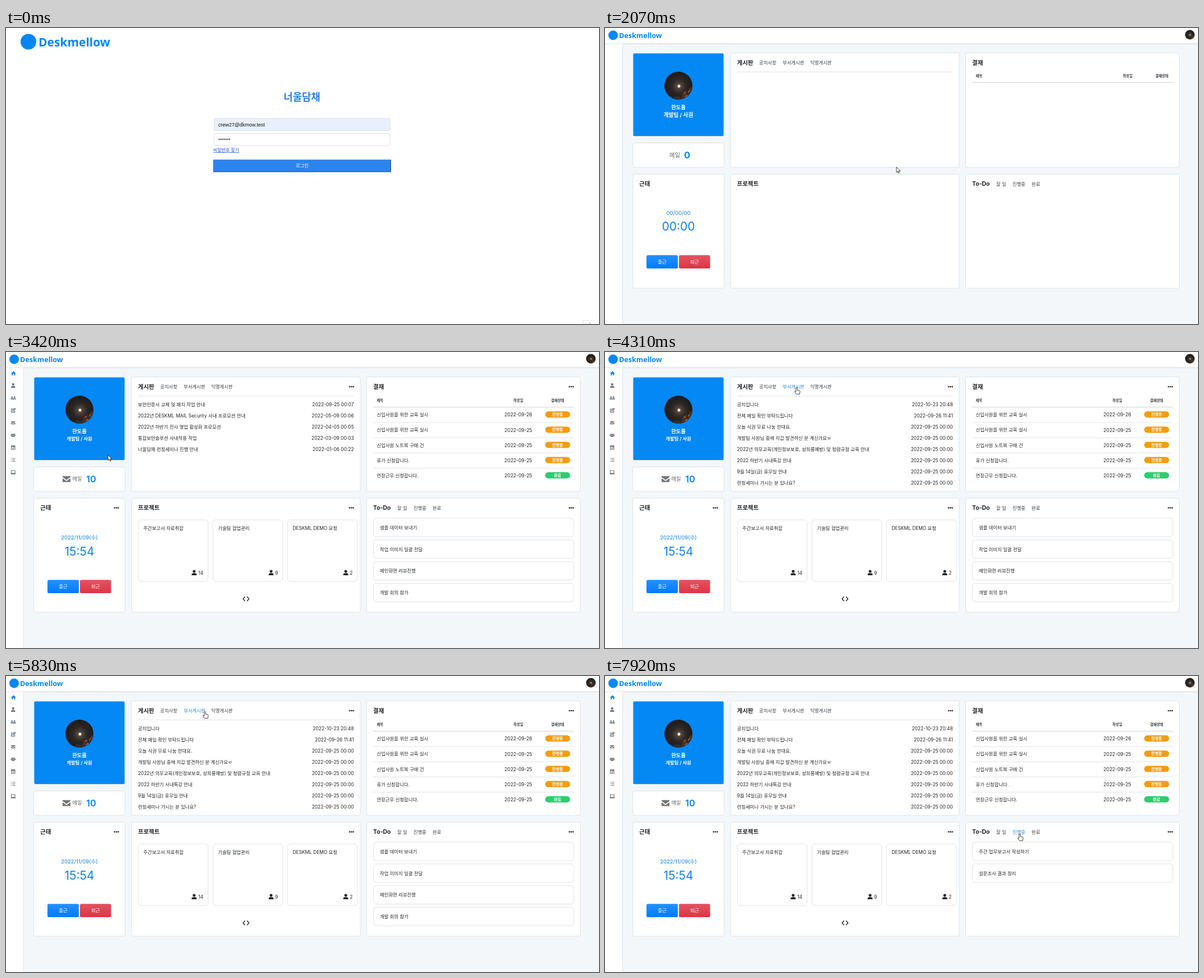
An HTML page for the animation above (7.99 s loop, 1058 by 529 pixels).

```html
<!DOCTYPE html>
<html lang="ko">
<head>
<meta charset="utf-8">
<title>Groupware tour</title>
<style>
  html, body { margin: 0; width: 100%; height: 100%; overflow: hidden; background: #fff; }
  svg { display: block; width: 1058px; height: 529px; font-family: Inter, 'Noto Sans CJK KR', sans-serif; }
  .brand { font-family: 'Noto Sans', 'Noto Sans CJK KR', sans-serif; }
  .arial { font-family: 'Liberation Sans', 'Noto Sans CJK KR', sans-serif; }
</style>
</head>
<body>
<svg id="stage" viewBox="0 0 1058 529" xmlns="http://www.w3.org/2000/svg"></svg>
<script>
const LOOP = 7990;
const BLUE = '#0388f4', INK = '#212529', LINE = '#dee2e6', GRAY = '#6c757d';

// drawing helpers
const text = (x, y, s, size = 8.4, o = {}) =>
  `<text x="${x}" y="${y}" font-size="${size}" font-weight="${o.w || 400}" fill="${o.c || INK}"` +
  ` text-anchor="${o.a || 'start'}" ${o.x || ''}>${s}</text>`;
const box = (x, y, x2, y2, fill, stroke = 'none', r = 0, extra = '') =>
  `<rect x="${x}" y="${y}" width="${x2 - x}" height="${y2 - y}" rx="${r}" fill="${fill}" stroke="${stroke}" ${extra}/>`;
const dot = (x, y, r, fill) => `<circle cx="${x}" cy="${y}" r="${r}" fill="${fill}"/>`;
const path = (d, fill = 'none', stroke = 'none', w = 1) =>
  `<path d="${d}" fill="${fill}" stroke="${stroke}" stroke-width="${w}"/>`;
const hline = (x, x2, y, c = LINE) => path(`M${x} ${y}H${x2}`, 'none', c);
const at = (x, y, s, k = 1) => `<g transform="translate(${x} ${y}) scale(${k})">${s}</g>`;
const more = (x, y = 278.5) => [0, 3.3, 6.6].map(d => dot(x + d, y, 1.35, INK)).join('');
const title = (x, y, s) => text(x, y, s, 10.5, { w: 700 });
const card = (x, y, x2, y2) => box(x, y, x2, y2, '#fff', '#dbe3ea', 2.5);

// groups shown between two times
const layers = [];
const layer = (from, to, s) => {
  layers.push({ from, to });
  return `<g class="layer">${s}</g>`;
};

// hoverable tabs
const tabs = [];
const tab = (x, x2, y, s) => {
  tabs.push({ x, x2, y });
  return text(x, y, s, 8.35, { c: '#343a40', x: 'class="tab"' });
};

const person = '<circle cy="-2.3" r="2.3"/><path d="M-4 4.2V3Q-4 .6-1.6.6H1.6Q4 .6 4 3V4.2Z"/>';
const envelope = '<path d="M-4-3H4V-2L0 1L-4-2ZM-4-.8L0 2.2L4-.8V3.2H-4Z"/>';

const photo = (x, y, r) => at(x, y,
  `<circle r="25" fill="url(#night)"/><g clip-path="url(#disc)">
   <path d="M4 25L8 12L14 8L16 18L20 4L25 2V25Z" fill="#4a2f22"/>
   <path d="M-12 25L-6 19L3 20L8 25Z" fill="#33302b"/>
   <path d="M10 14L13 12M17 12L20 8M12 20L16 17" stroke="#c4713c" stroke-width="1.2"/></g>
   <circle cx="1" cy="1" r="2.4" fill="#fff3dc"/>`, r / 25);

function login() {
  return box(0, 0, 1058, 529, '#fff') +
    dot(40, 24.5, 14, '#0886f0') +
    `<g class="brand">${text(58, 33, 'Deskmellow', 21, { w: 600, c: '#0886f0' })}</g>` +
    text(528, 130.3, '너울담채', 17.8, { w: 700, c: '#2b80e6', a: 'middle' }) +
    box(371.3, 161.7, 685.2, 183.4, '#e8f0fe', '#d0d8e5', 2.5, 'stroke-width=".8"') +
    box(371.3, 188.4, 685.2, 210.1, '#fff', '#d6dae0', 2.5, 'stroke-width=".8"') +
    `<g class="arial">${text(378.7, 175.5, 'crew27@dkmow.test', 9, { c: '#111' })}</g>` +
    Array.from({ length: 7 }, (_, i) => dot(380.3 + i * 3.1, 198.8, 1.15, '#222')).join('') +
    text(370, 221.3, '비밀번호 찾기', 7.9, { c: '#1d4fd8', x: 'text-decoration="underline"' }) +
    box(369.5, 235.2, 687, 257.4, '#2d84ec') +
    path('M370 256.8H686.4V235.6', 'none', '#1c5199', 1.1) +
    text(528.5, 249.4, '로그인', 8.1, { c: '#fff', a: 'middle' });
}

const tooltip = box(1029.5, 522.5, 1049, 540, '#fff', '#e2e2e2') +
  text(1039, 532, '노트', 7, { c: '#aaa', a: 'middle' });

function frame() {
  return box(0, 0, 1058, 529, '#fff') + box(31.5, 28, 1060, 531, '#f3f7f9', LINE) +
    hline(0, 1058, 28) + dot(14.5, 13, 8.5, BLUE) +
    `<g class="brand">${text(25, 18, 'Deskmellow', 12.6, { w: 600, c: '#0886f0' })}</g>` +
    photo(1043.5, 12, 8.5) +
    box(50, 45, 212, 193.5, BLUE, '#cfe4f6', 2.5) + photo(131, 103, 25) +
    text(131, 144.6, '한도율', 9.5, { w: 700, c: '#fff', a: 'middle' }) +
    card(49.5, 205.5, 212.5, 249) + card(49.5, 261.5, 212.5, 465) +
    card(224, 44.5, 632, 249) + card(224.5, 261.5, 632, 465) +
    card(643.5, 44.5, 1024.5, 249) + card(643.5, 261.5, 1024.5, 465) +
    title(61, 282, '근태') + title(235.5, 66, '게시판') + title(235.5, 282, '프로젝트') +
    title(655, 66, '결재') + title(655, 282, 'To-Do') +
    tab(275, 306, 65.2, '공지사항') + tab(317, 355, 65.2, '부서게시판') + tab(366, 405, 65.2, '익명게시판') +
    tab(698, 716, 281.8, '할 일') + tab(727, 750, 281.8, '진행중') + tab(761, 777, 281.8, '완료') +
    hline(235.5, 620.5, 78.5);
}

// clock, buttons and table head, placed a little differently before loading ends
function clock(date, size, time, dy) {
  const button = (x, x2, id, s) => box(x, 407.3 + dy, x2, 431 + dy, `url(#${id})`, 'none', 2.5) +
    text((x + x2) / 2, 422.3 + dy, s, 8.5, { c: '#fff', a: 'middle' });
  return text(131, 335.4 + dy, date, size, { c: '#0f80e8', a: 'middle' }) +
    text(131, 363.6 + dy, time, 21, { c: '#0f80e8', a: 'middle' }) +
    button(74, 130, 'blue', '출근') + button(132, 187.5, 'red', '퇴근');
}
function tableHead(x, x2, dy) {
  const o = { w: 700, c: '#343a40' }, m = { ...o, a: 'middle' };
  return text(661.5, 88.6 + dy, '제목', 6.3, o) + text(x, 88.6 + dy, '작성일', 6.3, m) +
    text(x2, 88.6 + dy, '결재상태', 6.3, m) + hline(655, 1013, 98.5 + dy, '#cdd2d7');
}
const dept = size => text(131, size > 9 ? 158.8 : 158, '개발팀 / 사원', size, { w: 700, c: '#fff', a: 'middle' });

function sideIcons() {
  const icons = [
    '<path d="M-4.6.2L0-4L4.6.2L4 1L3.2.4V4H1V1H-1V4H-3.2V.4L-4 1Z" fill="#0886f0"/>',
    person,
    at(-2.2, 0, person, .68) + at(2.6, 0, person, .68),
    '<path d="M1.5-2.8H-3.5V3.6H3V.5M-1 1L-.6-.8L3.2-4L4.4-2.8L.8.6Z" fill="none" stroke="#6c757d" stroke-width="1.3"/>',
    envelope,
    at(-3, -.5, person, .5) + at(3, -.5, person, .5) + at(0, .4, person, .72),
    '<path d="M-3.5-3H3.5V4H-3.5ZM-2-4.4V-2M2-4.4V-2M-1.6 1L-.3 2.3L2-.2" fill="none" stroke="#6c757d" stroke-width="1.2"/><path d="M-3.5-3H3.5V-1H-3.5Z"/>',
    [-3, 0, 3].map(y => `<path d="M-4 ${y - .6}H-2.6V${y + .6}H-4ZM-1.5 ${y - .5}H4V${y + .5}H-1.5Z"/>`).join(''),
    '<path d="M-3.6-3H3.6V2.3H-3.6ZM-4.8 3.3H4.8" fill="none" stroke="#6c757d" stroke-width="1.2"/>'
  ];
  return `<g fill="${GRAY}">${icons.map((s, i) => at(i ? 12.8 : 13.3, 38 + i * 22.1, s, .92)).join('')}</g>`;
}

const board = rows => rows.map(([s, d], i) =>
  text(235.5, 97.2 + i * 20, s) +
  text(620.7, 97.2 + i * 20, '2022-' + (d || '09-25 00:00'), 8.45, { a: 'end' })).join('');
const notices = [
  ['보안인증서 교체 및 패치 작업 안내', '09-25 00:07'],
  ['2022년 DESKML MAIL Security 사내 프로모션 안내', '05-09 00:06'],
  ['2022년 하반기 전사 영업 활성화 프로모션', '04-05 00:05'],
  ['통합보안솔루션 사내적용 작업', '03-09 00:03'],
  ['너울담채 런칭세미나 진행 안내', '01-06 00:22']
];
const teamPosts = [
  ['공지입니다', '10-23 20:48'], ['전체 메일 확인 부탁드립니다', '09-26 11:41'],
  ['오늘 식권 무료 나눔 한대요.'], ['개발팀 사원님 중에 지갑 발견하신 분 계신가요ㅠ'],
  ['2022년 의무교육(개인정보보호, 성희롱예방) 및 청렴규정 교육 안내'],
  ['2022 하반기 사내특강 안내'], ['9월 14일(금) 휴무일 안내'], ['런칭세미나 가시는 분 있나요?']
];
const smoke = ['담배는 흡연구역에서 핍시다!'], gossip = ['밑글 보고 적는데 전담은 괜찮은가요'];
const anonPosts = [
  ['옥장판 하나 사세요 ~!', '09-26 10:02'], smoke, gossip, ['공포 웹툰 추천해주세요'],
  ['오늘 점심 뭔가요?'], ['저 오늘 야근 당첨입니다'], smoke, gossip
];

const rowTop = i => 99 + i * 27.2;
function approvals() {
  const rows = ['신입사원을 위한 교육 실시', '신입사원을 위한 교육 실시', '신입사원 노트북 구매 건', '휴가 신청합니다.', '연장근무 신청합니다.'];
  return rows.map((s, i) => {
    const y = rowTop(i), done = i === 4;
    return (done ? '' : hline(655, 1013, y + 27)) + text(661.5, y + 16.2, s) +
      text(914, y + 16.3, '2022-09-' + (i ? 25 : 26), 8.5, { a: 'middle' }) +
      box(962, y + 7, 1006.5, y + 18.2, done ? '#2ecc71' : '#f39c12', 'none', 5.6) +
      text(984, y + 15.2, done ? '완료' : '진행중', 7.1, { w: 700, c: '#fff', a: 'middle' });
  }).join('');
}

function projects() {
  return [['주간보고서 자료취합', 14], ['기술팀 협업관리', 9], ['DESKML DEMO 요청', 2]].map(([s, n], i) => {
    const x = 236 + i * 133.2;
    return box(x, 300, x + 124.5, 410, '#fff', LINE, 5) + text(x + 9, 317.7, s) +
      text(x + 116, 397.6, n, 8.5, { a: 'end' }) +
      at(x + (n > 9 ? 99.7 : 103.8), 394.5, `<g fill="${INK}">${person}</g>`, 1.1);
  }).join('') + path('M426.5 437.2L423 441.2L426.5 445.2M430 437.2L433.5 441.2L430 445.2', 'none', INK, 1.4);
}

const todos = rows => rows.map((s, i) => {
  const y = 297 + i * 38.8;
  return box(655.5, y, 1013, y + 33, '#fff', LINE, 5) + text(667, y + 19.7, s);
}).join('');

const mail = at(108, 227, `<g fill="#777">${envelope}</g>`, 1.75) +
  text(118.5, 230.3, '메일', 9.3, { w: 500, c: '#666' }) + text(143, 232.7, '10', 16.5, { w: 600, c: '#0886f0' });
const mailEmpty = text(115, 231, '메일', 10.4, { w: 500, c: '#666' }) +
  text(141, 233.2, '0', 16.5, { w: 700, c: '#0886f0' });

const LOADED = 2210, DATA = 2280, END = LOOP;
const stage = document.getElementById('stage');
stage.innerHTML = `<defs>
  <radialGradient id="night" cx=".52" cy=".52" r=".52"><stop offset="0" stop-color="#b59a80"/>
    <stop offset=".16" stop-color="#54453b"/><stop offset=".5" stop-color="#2b2624"/><stop offset="1" stop-color="#1c1a1b"/></radialGradient>
  <linearGradient id="blue" x2="0" y2="1"><stop stop-color="#2690ff"/><stop offset="1" stop-color="#007bff"/></linearGradient>
  <linearGradient id="red" x2="0" y2="1"><stop stop-color="#e25361"/><stop offset="1" stop-color="#dc3545"/></linearGradient>
  <clipPath id="disc"><circle r="25"/></clipPath></defs>` +
  layer(0, 1950, login()) + layer(0, 70, tooltip) +
  layer(1950, END, frame()) +
  layer(1950, LOADED, dept(9.7) + clock('00/00/00', 9.6, '00:00', -1.2) + tableHead(932.5, 993.5, -1)) +
  layer(LOADED, END, dept(8.3) + clock('2022/11/09(수)', 9.5, '15:54', 0) + tableHead(914, 984, 0) + sideIcons() +
    more(193.7) + more(613, 62) + more(1005.3, 62) + more(613) + more(1005.3)) +
  layer(1950, DATA, mailEmpty) + layer(DATA, END, mail) +
  layer(DATA, 4310, board(notices)) + layer(4310, 4940, board(teamPosts)) +
  layer(4940, 5660, board(anonPosts)) + layer(5660, END, board(teamPosts)) +
  box(655, 99.2, 1013, 125.6, '#f3f8fd', 'none', 0, 'id="hover"') +
  layer(DATA, END, approvals()) + layer(2350, END, projects()) +
  layer(DATA, 7846, todos(['샘플 데이터 보내기', '작업 이미지 일괄 전달', '메인화면 리뷰진행', '개발 회의 참가'])) +
  layer(7846, END, todos(['주간 업무보고서 작성하기', '설문조사 결과 정리'])) +
  `<g id="cursor">${path('M0 0V9.6L2.2 7.6L3.8 11L5.3 10.3L3.8 7H6.8Z', '#fff', '#111', .8)}${
    path('M-1.2 1Q0-.6 1.2 1V5L5 5.8Q6 6.2 6 7.4L5.2 12.4H-.6L-3.6 8.2Q-3.6 6.6-2.4 7L-1.2 8Z', '#fff', '#111', .8)}</g>`;

// cursor moves: first step, last step, step count, evenly spaced waypoints
const moves = [
  [460, 1080, 10, [[748, 502], [690, 425], [600, 318], [532, 252], [512, 236], [514, 242]]],
  [1410, 1480, 2, [[517, 245], [520, 248.5]]],
  [2760, 3550, 12, [[540, 262], [585, 305], [608, 355], [570, 384], [470, 386], [340, 372],
    [210, 340], [115, 285], [110, 225], [182, 184], [208, 132], [235, 81]]],
  [3620, 4110, 8, [[242, 78], [270, 68], [302, 63], [330, 62], [342, 63]]],
  [4570, 5090, 8, [[346, 61], [358, 56], [368, 59], [370, 62.5]]],
  [5420, 6160, 10, [[364, 62], [345, 63], [342, 63], [400, 64], [520, 68], [631, 71]]],
  [6220, 6920, 11, [[648, 74], [735, 95], [800, 109], [820, 112.5], [822, 118]]],
  [7180, 7920, 11, [[818, 126], [795, 180], [764, 240], [744, 277], [740, 282], [740, 282]]]
];

function cursorAt(t) {
  const m = moves.filter(m => t >= m[0]).pop();
  if (!m) return null;
  const [from, to, n, pts] = m;
  const k = Math.min(n - 1, Math.floor((t - from) / (to - from) * (n - 1) + .001));
  const u = k / (n - 1) * (pts.length - 1), i = Math.min(pts.length - 2, Math.floor(u)), f = u - i;
  return [0, 1].map(a => pts[i][a] + (pts[i + 1][a] - pts[i][a]) * f);
}

const layerEls = stage.querySelectorAll('.layer'), tabEls = stage.querySelectorAll('.tab');
const hover = document.getElementById('hover'), cursor = document.getElementById('cursor');
const [arrow, hand] = cursor.children;
const show = (el, on) => { el.style.display = on ? '' : 'none'; };

function draw(t) {
  layers.forEach((l, i) => show(layerEls[i], t >= l.from && t < l.to));
  const p = cursorAt(t), [x, y] = p || [-99, -99];
  const live = t >= DATA;
  let over = false;
  tabs.forEach((b, i) => {
    const on = live && x >= b.x - 1 && x <= b.x2 + 1 && Math.abs(y - b.y + 3) < 8;
    tabEls[i].setAttribute('fill', on ? '#2188e8' : '#343a40');
    over = over || on;
  });
  const row = Math.floor((y - 99) / 27.2);
  const onRow = live && x > 655 && x < 1013 && row >= 0 && row < 5;
  show(hover, onRow);
  if (onRow) hover.setAttribute('y', rowTop(row) + .2);
  show(cursor, p);
  cursor.setAttribute('transform', `translate(${x} ${y})`);
  show(hand, over || onRow);
  show(arrow, !(over || onRow));
}

const start = performance.now();
function tick() {
  draw((performance.now() - start) % LOOP);
  requestAnimationFrame(tick);
}
tick();
</script>
</body>
</html>
```
